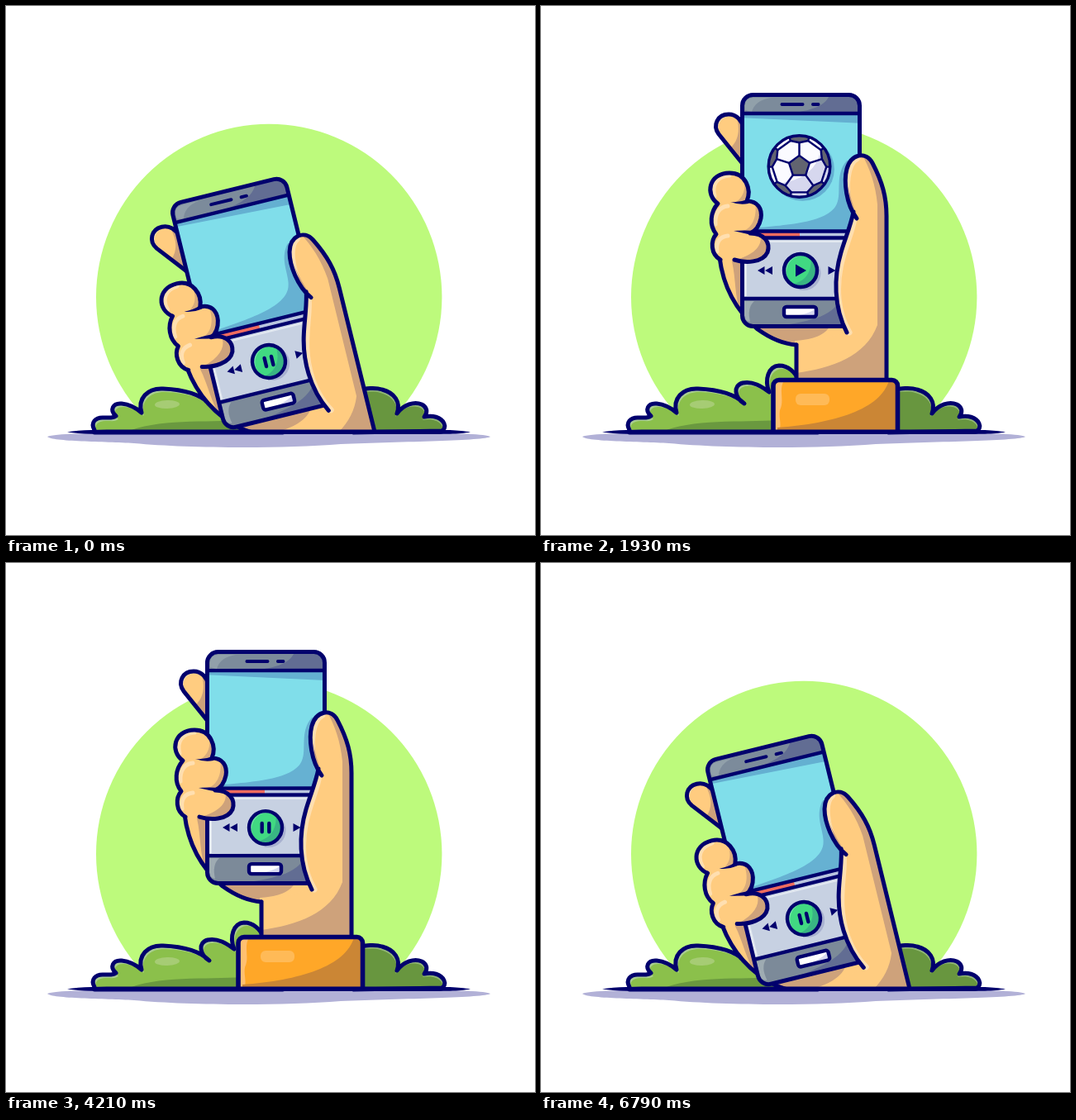
Recreate the animation shown at these times as an HTML page with a canvas. Size 640x640 px, loop 7.21 s.

```html
<!DOCTYPE html>
<html lang="en">
<head>
<meta charset="utf-8">
<title>Phone in hand</title>
<style>
html, body { margin: 0; width: 100%; height: 100%; overflow: hidden; background: #fff; }
canvas { display: block; width: 640px; height: 640px; }
</style>
</head>
<body>
<canvas id="stage" width="640" height="640"></canvas>
<script>
const ctx = document.getElementById('stage').getContext('2d');
const LOOP = 7210, CYCLE = 3640, GROUND = 515;
const NAVY = '#01006d', SKIN = '#ffcc80', TAN = '#cea27b', PALE = '#ffdfb0';
const BALL = { x: 312.5, y: 194, r: 37 };
const BUTTON = { x: 314, y: 320 };

const P = d => new Path2D(d);
const fill = (p, c) => { ctx.fillStyle = c; ctx.fill(typeof p === 'string' ? P(p) : p); };
const ink = (p, w = 5, c = NAVY) => {
  ctx.strokeStyle = c;
  ctx.lineWidth = w;
  ctx.lineCap = ctx.lineJoin = 'round';
  ctx.stroke(typeof p === 'string' ? P(p) : p);
};
const round = (x, y, w, h, r) => {
  const p = new Path2D();
  p.roundRect(x, y, w, h, r);
  return p;
};
const disc = (x, y, r) => {
  const p = new Path2D();
  p.arc(x, y, r, 0, Math.PI * 2);
  return p;
};
const group = draw => { ctx.save(); draw(); ctx.restore(); };
const inside = (p, draw) => group(() => { ctx.clip(p); draw(); });
const aboveGround = round(0, 0, 640, GROUND, 0);

// Base colour with a light rim along the upper edge
function rimmed(p, color, rim, dx, dy) {
  fill(p, rim);
  inside(p, () => { ctx.translate(dx, dy); fill(p, color); });
}

const clamp = v => Math.min(1, Math.max(0, v));
const ramp = (t, start, length) => clamp((t - start) / length);
const smooth = t => t * t * (3 - 2 * t);
const backOut = t => 1 + 2.70158 * (t - 1) ** 3 + 1.70158 * (t - 1) ** 2;
const backIn = t => 1 - backOut(1 - t);

const leftBush = P('M107 513C102 504 108 497 119 498C125 498 129 499 133 496C125 489 129 480 140 481C150 482 157 486 164 492C159 475 171 462 190 463C215 464 235 470 246 481C234 474 232 459 244 456C258 453 270 463 276 467C270 452 275 436 288 435C299 435 308 443 312 454L335 516H107Z');
const rightBush = P('M420 516V465C434 463 446 461 455 464C470 468 478 479 473 493C481 482 494 478 503 482C509 485 511 491 506 497C516 495 526 497 530 505C532 509 530 513 527 514Z');

function scenery() {
  fill('M50 521C60 517 100 517 150 516H490C550 517 580 518 586 521C580 526 480 527 405 530C330 536 220 535 155 529C120 527 55 527 50 521Z', '#b2b1d7');
  inside(aboveGround, () => fill(disc(318.2, 352, 209.2), '#bdfa7c'));
  rimmed(leftBush, '#8bc04b', '#a9cd91', 3, 4);
  inside(leftBush, () => {
    fill('M145 516C180 499 245 504 285 501L340 494V516Z', '#6a993f');
    ctx.beginPath();
    ctx.ellipse(195, 482, 15, 5, -0.03, 0, 7);
    ctx.fillStyle = '#a6cc74';
    ctx.fill();
  });
  ink(leftBush);
  rimmed(rightBush, '#68963f', '#91b676', -2, 4);
  ink(rightBush);
}

function ground() {
  fill('M74 515.5C90 512.5 115 512.5 140 512.5H500C530 512.5 548 513 562 515.5C548 518 530 518 500 518H140C115 518 90 518 74 515.5Z', NAVY);
}

const pointer = P('M244 191L215 155C207 144 214 131 227 131C237 131 243 139 245 147Z');
const palm = P('M216 300C221 345 240 372 262 391C280 404 295 409 309 410V460H418V300Z');

function backHand() {
  rimmed(pointer, SKIN, PALE, 3, 2);
  inside(pointer, () => fill('M236 132C241 148 240 162 229 172L250 198V132Z', TAN));
  ink(pointer);
  fill(palm, SKIN);
  inside(palm, () => {
    fill('M231 309H250V372H242C234 353 236 330 231 309Z', TAN);
    fill('M255 387H350C342 400 325 404 307 405V411C285 409 267 400 255 387Z', TAN);
  });
  ink('M216 304C221 345 240 372 262 391C280 404 295 409 309 410');
}

const body = round(243.5, 107.5, 142, 280, 13);

function phone() {
  inside(body, () => {
    fill('M240 105H390V130H240Z', '#7c8b9b');
    fill('M350 105C346 120 330 127 296 130H390V105Z', '#626d93');
    fill('M247 126V119Q248 111 257 111H278Q259 114 255 128Z', '#91a0aa');
    fill('M240 130H390V273H240Z', '#80deea');
    fill('M240 131H390V142L240 135Z', '#64b0d1');
    fill('M370 187C355 204 364 226 358 239C348 264 290 265 245 270V273H390V187Z', '#66b1d2');
    fill('M240 273H313V281H240Z', '#ef6b5e');
    fill('M313 273H390V281H313Z', '#b9c5df');
    fill('M240 281H390V354H240Z', '#c7d1e2');
    fill('M246 284H364V286H249V351H246Z', '#e3e9f1');
    fill('M240 354H390V390H240Z', '#7c8a99');
    fill('M362 354C356 372 332 382 283 387H390V354Z', '#626d93');
    fill('M246 357H258Q249 365 253 382Q246 381 246 374Z', '#9eabb2');
  });
  ink('M244 130H385M244 272.5H385M244 280.5H385M244 354H385', 4.4);
  ink(body);
  ink('M291.5 119H316.5M329 119H335.5', 4);
  const home = round(294, 364, 39, 12, 3);
  fill(home, '#fff');
  inside(home, () => fill('M334 364Q327 373 299 376H334Z', '#d6d8ef'));
  ink(home, 4.4);
}

function controls(pause, play) {
  const { x, y } = BUTTON, face = disc(x, y, 20);
  fill(disc(x + 4, y + 3.5, 20.5), '#a9b2d0');
  fill(face, '#70e6a5');
  inside(face, () => {
    fill(disc(x + 3, y + 2, 20), '#41d982');
    fill('M326 300C330 326 315 337 298 337L314 345H340V300Z', '#39b583');
  });
  ink(face, 4.4);
  fill('M262 320L270.5 315V325ZM271 320L280 315V325ZM347.5 315V325L356.5 320ZM357 315V325L366 320Z', NAVY);
  const icon = (scale, draw) => {
    if (scale <= 0) return;
    group(() => {
      ctx.translate(x, y);
      ctx.scale(scale, scale);
      draw();
    });
  };
  icon(pause, () => ink('M-4.3 -5.2V5.2M4.3 -5.2V5.2', 4.4));
  icon(play, () => fill('M-6 -7.5L7 0L-6 7.5Z', NAVY));
}

function ball(scale) {
  if (scale <= 0) return;
  const { x, y, r } = BALL, rim = disc(0, 0, r);
  const at = (radius, a) => [radius * Math.cos(a), radius * Math.sin(a)];
  const poly = pts => {
    const p = new Path2D();
    pts.forEach(q => p.lineTo(...q));
    p.closePath();
    return p;
  };
  const dirs = [0, 1, 2, 3, 4].map(i => (i * 72 - 90) * Math.PI / 180);
  group(() => {
    ctx.translate(x, y);
    ctx.scale(scale, scale);
    fill(disc(4, 3.5, 38), '#64b0d2');
    fill(rim, '#fbfbff');
    inside(rim, () => {
      fill('M25 -31C29 0 5 20 -33 21L-20 42H42V-31Z', '#d6d7ee');
      const center = poly(dirs.map(a => at(13, a)));
      fill(center, '#626470');
      ink(center, 2.4);
      dirs.forEach(a => {
        const patch = poly([at(28.5, a), at(32.5, a + 0.33), at(42, a + 0.33), at(42, a - 0.33), at(32.5, a - 0.33)]);
        fill(patch, '#626470');
        ink(patch, 2.4);
        const seam = new Path2D();
        seam.moveTo(...at(13, a));
        seam.lineTo(...at(28.5, a));
        seam.moveTo(...at(32.5, a + 0.33));
        seam.lineTo(...at(32.5, a + 0.4 * Math.PI - 0.33));
        ink(seam, 2.4);
      });
    });
    ink(rim, 3.4);
  });
}

const fingers = P('M214 239C198 228 203 202 228 202C248 202 255 222 249 236C262 236 268 245 266 257C264 267 260 272 253 275C270 275 278 286 274 298C268 313 240 309 217 307C205 300 205 284 212 276C203 265 205 249 214 239Z');
const thumb = P('M370 395C354 364 354 328 363 298C368 281 375 265 377 249C369 235 367 212 370 197C375 179 393 175 401 190C413 213 418 231 418 254V460H309V410Z');

function frontHand() {
  fill(fingers, SKIN);
  inside(fingers, () => {
    ink('M210 230C206 216 213 206 228 205M211 264C210 251 216 243 226 242M213 297C211 285 217 279 226 278', 5, PALE);
    fill('M244 203C249 219 246 232 234 238H255V203Z', '#d9ab7b');
    fill('M259 237C262 256 255 270 242 273H270V237Z', '#d9ab7b');
    fill('M265 276C269 290 258 302 229 309H280V276Z', TAN);
  });
  ink('M217 307C205 300 205 284 212 276C203 265 205 249 214 239C198 228 203 202 228 202C248 202 255 222 249 236C262 236 268 245 266 257C264 267 260 272 253 275C270 275 278 286 274 298C268 311 247 311 234 307');
  fill('M229 237Q240 238 250 234L251 239Q240 241 229 237ZM233 272Q245 271 259 272L264 278Q248 276 233 272Z', NAVY);

  fill(thumb, SKIN);
  inside(thumb, () => {
    ink('M373 238C368 220 370 190 383 184M379 257C376 280 356 310 360 354C362 373 367 385 373 395', 7, PALE);
    fill('M389 181C397 195 405 216 407 240V386C393 424 352 438 309 444V462H420V181Z', TAN);
    fill('M371 201C372 224 376 237 382 254L374 243Z', TAN);
  });
  ink('M370 395C354 364 354 328 363 298C368 281 375 265 378 249M382 257C369 240 366 212 370 197C375 179 393 175 401 190C413 213 418 231 418 254V456M309 410V456');
}

function cuff() {
  const shape = round(281, 452.5, 150.5, 180, 7);
  fill(shape, '#ffa728');
  inside(shape, () => {
    fill('M281 453H294C287 465 295 476 289 489C287 500 293 506 286 520H281Z', '#ffc071');
    fill('M421 453C411 488 355 505 286 510V640H435V453Z', '#cb8635');
    fill(round(308, 469, 41, 14, 6), '#ffba57');
  });
  ink(shape, 5.6);
}

function pose(t) {
  const second = t >= 3600;
  const u = second ? t - CYCLE : t;
  const up = smooth(ramp(u, 0, second ? 580 : 570));
  const down = smooth(second ? ramp(t, 6120, 620) : ramp(t, 2570, 608));
  const closing = u > 1600;
  return {
    low: 1 - up + down,
    ball: closing ? 1 - backIn(ramp(u, 1900, 400)) : backOut(ramp(u, 897, 393)),
    pause: closing ? backOut(ramp(u, 2330, 180)) : 1 - smooth(ramp(u, 700, 100)),
    play: closing ? 1 - smooth(ramp(u, 2230, 100)) : smooth(ramp(u, 800, 120))
  };
}

function draw(now) {
  const s = pose(now % LOOP);
  ctx.clearRect(0, 0, 640, 640);
  scenery();
  inside(aboveGround, () => {
    ctx.translate(BUTTON.x + 4 * s.low, BUTTON.y + 110 * s.low);
    ctx.rotate(-13.8 * s.low * Math.PI / 180);
    ctx.translate(-BUTTON.x, -BUTTON.y);
    backHand();
    phone();
    ball(s.ball);
    controls(s.pause, s.play);
    frontHand();
    cuff();
  });
  ground();
}

const began = performance.now();
function tick() {
  draw(performance.now() - began);
  requestAnimationFrame(tick);
}
tick();
</script>
</body>
</html>
```
